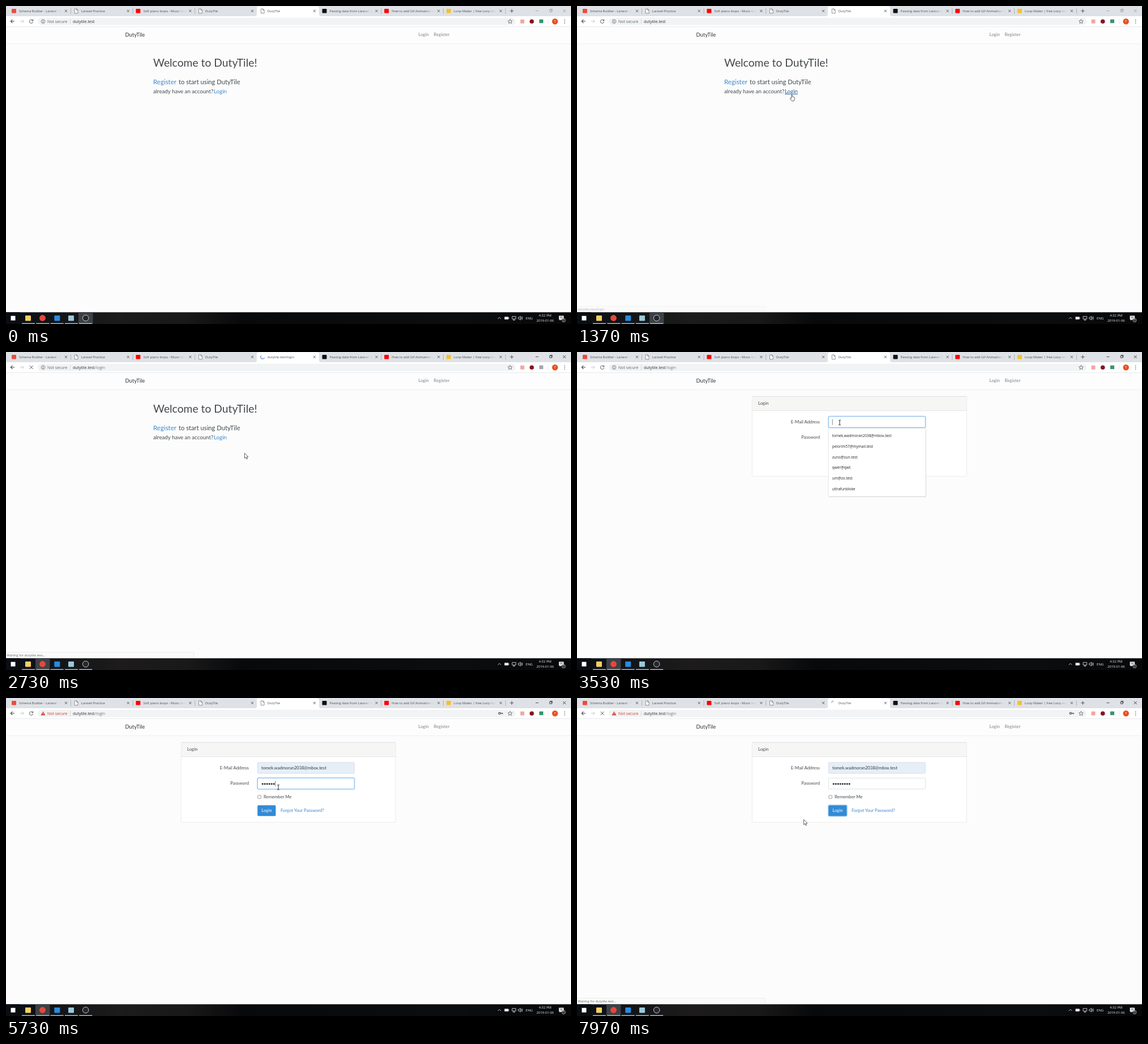
These frames come from a looping animation (998 px wide and 561 px high, 8000 ms). An HTML page:

```html
<!DOCTYPE html>
<html lang="en">
<head>
<meta charset="utf-8">
<title>DutyTile</title>
<style>
  html, body { margin: 0; width: 100%; height: 100%; overflow: hidden; background: #fcfcfc; }
  svg { display: block; width: 100vw; height: 100vh; }
  text { font-family: "Open Sans", "Noto Sans", sans-serif; white-space: pre; }
  .site text { font-family: Lato, "Open Sans", sans-serif; }
  .line { fill: none; stroke: #45494d; stroke-width: .9; }
  .tray { fill: none; stroke: #eee; stroke-width: .8; }
</style>
</head>
<body>
<svg id="stage" viewBox="0 0 998 561"></svg>
<script>
const LOOP = 8000, APP = 'DutyTile', HOST = 'dutytile.test', MAIL = 'tomek.wadmoran2038@mbox.test';
const INK = '#43494e', LINK = '#3a87cd';
const stage = document.getElementById('stage');
const $ = id => document.getElementById(id);

const text = (x, y, s, size, fill = INK, extra = '') =>
  `<text x="${x}" y="${y}" font-size="${size}" fill="${fill}" ${extra}>${s}</text>`;
const rect = (x, y, w, h, fill, extra = '') =>
  `<rect x="${x}" y="${y}" width="${w}" height="${h}" fill="${fill}" ${extra}/>`;
const path = (d, extra = 'class="line"') => `<path d="${d}" ${extra}/>`;
const disc = (x, y, r, fill, extra = '') => `<circle cx="${x}" cy="${y}" r="${r}" fill="${fill}" ${extra}/>`;
const group = (id, body, extra = '') => `<g id="${id}" ${extra}>${body}</g>`;

// Browser tabs: title and icon colour (none = blank page icon)
const tabs = [
  ['Schema Builder - Laravel - The', '#ee4b3c'], ['Laravel Practice'],
  ['Soft piano loops - Music to re', '#f00'], [APP], [APP],
  ['Passing data from Laravel to V', '#111'], ['How to add Gif Animation to', '#f00'],
  ['Loop Maker | free Loop mak', '#f2c230']
];

function tab([title, color], i) {
  const x = i * 109.7, active = i === 4;
  const icon = color ? rect(x + 10, 5, 8, 7.5, color, 'rx="1"')
    : path(`M${x + 11.5} 5h3.8l2 2v5.8h-5.8zM${x + 15} 5v2.3h2.3`, 'fill="#fff" stroke="#666" stroke-width=".7"');
  const back = active
    ? path('M439.5 18q3.5 0 3.5-3.5V4q0-3.5 3.5-3.5h103q3.5 0 3.5 3.5v10.5q0 3.5 3.5 3.5z', 'fill="#fff"')
    : '';
  const fade = active ? '' : rect(x + 82, 2, 15, 14, 'url(#fade)') + rect(x + 97, 2, 14, 14, '#dee1e6');
  const rule = i === 3 || active ? '' : rect(x + 114, 4, .7, 10, '#9a9da2');
  return back + group('icon' + i, icon) + text(x + 23, 10.8, title, 5.8, '#4a4d51', `id="title${i}"`) + fade +
    path(`M${x + 104} 6.7l4 4m0-4l-4 4`) + rule;
}

const browser = () =>
  rect(0, 0, 998, 18, '#dee1e6') + rect(0, 18, 998, 18.5, '#fff') + tabs.map(tab).join('') +
  disc(453.3, 8.7, 3.4, 'none', 'id="spinner" stroke-width="1.1"') +
  path('M890.2 8.7h6.4m-3.2-3.2v6.4') +
  group('controls', path('M935.5 8.5h5M960.3 6.7h3.5v3.5h-3.5zm1-.2v-1h3.5v3.6h-1M983.8 6l5 5m0-5l-5 5', 'fill="none" stroke-width=".8"')) +
  path('M15 27H8.4m3-3.1L8.3 27l3.1 3.1', 'class="line" style="stroke-width:1.1"') +
  path('M24.7 27h6.6m-3-3.1l3.1 3.1-3.1 3.1', 'class="line" style="stroke:#c2c4c6"') +
  group('reload', path('M47.2 25.3a3.2 3.2 0 1 0 .5 2.7M47.8 23.4v2.7h-2.7')) +
  group('stop', path('M41.7 24l6 6m0-6l-6 6')) +
  rect(56, 20.7, 844, 13, '#f1f3f4', 'rx="6.5"') +
  group('plain', disc(65.5, 27.2, 3.3, 'none', 'stroke="#5f6368" stroke-width=".8"') +
    path('M65.5 25v.9m0 .8v2.6') + text(73, 29.7, 'Not secure', 7, '#5f6368')) +
  group('warn', path('M65.5 23.4l3.9 7.2h-7.8z', 'fill="#d33a2f"') +
    path('M65.5 25.8v2.3m0 .6v.9', 'stroke="#fff" stroke-width=".8"') + text(73, 29.7, 'Not secure', 7, '#d33a2f')) +
  rect(113, 22.5, .6, 9.5, '#c4c7ca') +
  text(118, 29.7, `${HOST}<tspan id="route" fill="#74787c">/login</tspan>`, 7, '#2c2e30') +
  group('key', disc(871.8, 27, 1.6, 'none', 'stroke="#55595d" stroke-width="1.3"') +
    path('M873.5 27h4.2m-1 0v1.6', 'fill="none" stroke="#55595d" stroke-width="1.3"')) +
  path('M890.4 23.3l1.1 2.6 2.8.2-2.1 1.8.7 2.8-2.5-1.5-2.4 1.5.6-2.8-2.1-1.8 2.8-.2z', 'class="line" style="stroke-width:.7"') +
  rect(908.5, 23.7, 7, 7, '#f0a7a0', 'rx="1"') + disc(928.7, 27.2, 3.8, '#8c1220') +
  rect(942, 23.7, 7, 6.5, '#35946e', 'id="ext"') + rect(957.5, 22, .6, 10, '#dadce0') +
  disc(969.7, 27.2, 5.2, '#e8501e') + text(969.7, 29.3, 'T', 5.6, '#fff', 'text-anchor="middle"') +
  [24.2, 27.2, 30.2].map(y => disc(986.7, y, .8, '#55595d')).join('') +
  rect(0, 36.2, 998, .8, '#e3e5e8');

const home = () =>
  text(260, 107, `Welcome to ${APP}!`, 19.3) +
  text(260, 138.2, 'Register', 11.5, LINK) + text(305, 138.2, `to start using ${APP}`, 11.2) +
  text(260, 153.9, 'already have an account?', 9.7) + text(367, 153.9, 'Login', 9.7, LINK, 'id="link"');

const field = (id, y) => rect(444.3, y, 171, 19.3, '#fff', `id="${id}" rx="2"`);
const ring = (id, x, y, w, h) =>
  rect(x, y, w, h, 'none', `id="${id}" rx="2.5" stroke="#3490dc" stroke-opacity=".32" stroke-width="1.8"`);

const login = () =>
  rect(309.3, 78.3, 379, 141, '#fff', 'rx="2" stroke="#e2e2e0" stroke-width=".7"') +
  rect(309.6, 78.6, 378.4, 25, '#f6f6f5') + rect(309.3, 78, 379, .7, '#d8dbe9') + rect(309.3, 103.3, 379, .7, '#dcdddc') +
  text(320, 93, 'Login', 7.8) +
  text(429, 125.7, 'E-Mail Address', 7.8, INK, 'text-anchor="end"') +
  text(429, 153.3, 'Password', 7.8, INK, 'text-anchor="end"') +
  field('mail', 113.8) + ring('mailRing', 443.9, 113.4, 171.8, 20.1) + text(451, 126.2, MAIL, 7.6, '#33383c', 'id="mailText"') +
  field('pass', 141.2) + ring('passRing', 443.9, 140.8, 171.8, 20.1) +
  Array.from({ length: 8 }, (_, i) => disc(453.2 + 4 * i, 151.6, 1.55, '#33383c', `id="dot${i}"`)).join('') +
  rect(450.8, 118.7, .7, 10, '#555', 'id="caret"') +
  rect(444.8, 171.8, 5.6, 5.6, '#f6f6f6', 'rx=".8" stroke="#8d8d8d" stroke-width=".8"') + text(455, 177.2, 'Remember Me', 7.7) +
  rect(444.2, 189.2, 32.3, 19, '#3490dc', 'id="button" rx="2"') + ring('buttonRing', 443.6, 188.6, 33.5, 20.2) +
  text(460.4, 201.2, 'Login', 7.8, '#fff', 'text-anchor="middle"') + text(485, 201.2, 'Forgot Your Password?', 7.7, LINK);

const entries = [MAIL, 'pelorim57@mymail.test', 'zuno@zun.test', 'qwer@qwt', 'um@zo.test', 'ultrafunbloke'];
const menu = () =>
  rect(444.6, 136, 172, 120, '#0002', 'rx="1.5"') +
  rect(444, 134.6, 172, 120.4, '#fff', 'rx="1.5" stroke="#d5d5d5" stroke-width=".6"') +
  rect(444.3, 138.7, 171.4, 18.6, '#eee', 'id="pick"') +
  entries.map((s, i) => text(450.7, 150.3 + 18.7 * i, s, 6.5, '#222')).join('');

const slots = [[39, '#f7cf63'], [64.5, '#e5483a'], [90.3, '#2a8be0'], [115, '#9cc9d8']];
const taskbar = () =>
  rect(0, 540.3, 998, 20.7, 'url(#bar)') + rect(0, 540.3, 25, 20.7, '#0a0d12') +
  rect(128, 540.3, 25.5, 20.7, '#3d4146', 'id="active"') +
  rect(8.5, 546.7, 8, 8, '#fff') +
  slots.map(([x, c], i) => i === 1 ? disc(x, 550.5, 5.4, c) : rect(x - 5, 546 , 10, 9.4, c, 'rx="1"')).join('') +
  disc(140.7, 550.5, 5.3, '#26282c', 'stroke="#ddd" stroke-width=".9"') +
  [28, 53.3, 78.6, 103.9, 129.2].map(x => rect(x, 559.4, 23, 1.6, '#76b9ed')).join('') +
  path('M868.8 552l2.8-2.8 2.8 2.8', 'class="tray"') +
  rect(880.5, 548.3, 7, 4.6, '#eee') + rect(887.6, 549.6, 1, 2, '#eee') +
  path('M894 547.7h6.6v4.5H894zm3.3 4.5v2m-2 0h4', 'class="tray"') +
  path('M904.8 549.2h1.6l2.2-2v6.8l-2.2-2h-1.6zm5.2-.2q1.2 1.6 0 3.2m1.2-4.6q2.2 3 0 6', 'class="tray"') +
  text(918, 552.7, 'ENG', 6.1, '#eee') +
  text(952.3, 548, '4:32 PM', 6, '#eee', 'text-anchor="middle"') +
  text(952.3, 556.8, '2019-01-06', 5.9, '#eee', 'text-anchor="middle"') +
  path('M976.7 546.4h8.4v6.8h-5l-1.7 2v-2h-1.7z', 'fill="#fff"') + path('M978.4 548.5h5m-5 2h5', 'stroke="#222" stroke-width=".7"') +
  disc(985, 554.4, 3.2, '#26282c', 'stroke="#ddd" stroke-width=".6"') + text(985, 556.3, '1', 5, '#fff', 'text-anchor="middle"');

stage.innerHTML =
  `<defs><linearGradient id="fade"><stop stop-color="#dee1e6" stop-opacity="0"/><stop offset="1" stop-color="#dee1e6"/></linearGradient>
  <linearGradient id="bar"><stop stop-color="#0a0f15"/><stop offset=".2" stop-color="#1d1b1b"/><stop offset=".32" stop-color="#191919"/>
  <stop offset=".42" stop-color="#08090b"/><stop offset=".8" stop-color="#0c0d0f"/><stop offset="1" stop-color="#07080a"/></linearGradient></defs>` +
  rect(0, 0, 998, 561, '#fcfcfc') + browser() +
  group('page', rect(0, 37, 998, 29, '#fdfdfd') + rect(0, 66, 998, 1, '#eeeff4') +
    text(210.5, 54.2, APP, 9.4, '#2d3236') + text(728.4, 53.4, 'Login', 7.9, '#7d8083') + text(755.5, 53.4, 'Register', 7.9, '#7d8083') +
    group('home', home()) + group('login', login()), 'class="site"') +
  group('menu', menu()) +
  group('status', rect(-1, 529.8, 333, 11, '#fafafa', 'stroke="#e6e6e0" stroke-width=".7"') + text(1.5, 537.2, '', 5.8, '#63676a', 'id="hint"')) +
  taskbar() +
  group('cursor',
    group('arrow', path('M0 0v9l2.1-1.9 1.5 3.3 1.5-.7-1.5-3.2h2.8z', 'fill="#fff" stroke="#222" stroke-width=".7"')) +
    group('hand', path('M-.9 6.5V.9q0-.9.9-.9t.9.9v3.3q2.2 0 3.6.9.6.4.5 1.5l-.4 2.4-.8 2.3h-4L-2.9 7.6q-.5-1.2.6-1.4.6.1 1.4 1z', 'fill="#fff" stroke="#222" stroke-width=".7"')) +
    group('beam', path('M-1.9-4.4q1.9 0 1.9.8v7.2q0 .8 1.9.8M1.9-4.4q-1.9 0-1.9.8m0 7.2q0 .8-1.9.8', 'fill="none" stroke="#111" stroke-width=".9"')));

// Pointer stops: time, x, y of the hot spot
const route = [
  [220, 470, 566], [1220, 379.5, 156], [2150, 379.5, 156], [2650, 421.5, 178.5], [2800, 421.5, 178.5],
  [3300, 464, 124.5], [3560, 464, 124.5], [3800, 487, 147], [3960, 487, 147], [4350, 481, 157.5],
  [6480, 481, 157.5], [6740, 367, 176], [6810, 367, 176], [6930, 325, 186], [7220, 457, 203],
  [7430, 457, 203], [7880, 400.5, 214.5], [LOOP, 400.5, 214.5]
];
const keys = [4730, 5070, 5300, 5430, 5570, 5700, 5900, 6170];
const CLICK = 1880, COMMIT = 2700, PAINT = 2790, LOADED = 2930;
const MENU_ON = 3430, CHOSEN = 3940, PASS = 4420, SUBMIT = 7330;

function pointer(t) {
  const n = route.findIndex(p => p[0] > t);
  if (n < 1) return [-50, 600];
  const [a, ax, ay] = route[n - 1], [b, bx, by] = route[n];
  const k = (t - a) / (b - a), e = k * k * (3 - 2 * k);
  return [ax + (bx - ax) * e, ay + (by - ay) * e];
}

const show = (id, on) => $(id).setAttribute('display', on ? 'inline' : 'none');
const set = (id, attrs) => { for (const k in attrs) $(id).setAttribute(k, attrs[k]); };
const say = (id, s) => { if ($(id).textContent !== s) $(id).textContent = s; };

function draw(t) {
  const [x, y] = pointer(t);
  const over = (l, top, r, b) => x > l && x < r && y > top && y < b;
  const onLogin = t >= PAINT, open = t >= MENU_ON && t < CHOSEN, used = t >= CLICK;
  const loading = used && t < LOADED || t >= SUBMIT;
  const committed = t >= COMMIT && t < LOADED;
  const onLink = !onLogin && over(366, 145, 391, 158);
  const onButton = onLogin && over(444, 189, 477, 208);
  const onField = onLogin && (over(444, 113, 616, 134) || !open && over(444, 141, 616, 161));

  show('home', !onLogin); show('login', onLogin); show('menu', open);
  show('pick', over(444, 139, 616, 157));
  set('link', { fill: onLink ? '#1d5f9c' : LINK, 'text-decoration': onLink ? 'underline' : 'none' });

  show('reload', !loading); show('stop', loading); show('spinner', loading); show('icon4', !loading);
  set('spinner', committed
    ? { stroke: '#4f7fe0', 'stroke-dasharray': '12 30', transform: `rotate(${20 + (t - 2730) * .5} 453.3 8.7)` }
    : { stroke: '#8b9097', 'stroke-dasharray': '5.3 30', transform: `rotate(${180 - (t - 7970) * .36} 453.3 8.7)` });
  say('title4', committed ? HOST + '/login' : APP);
  show('route', t >= COMMIT);
  set('ext', { fill: committed ? '#a3a8ad' : '#35946e' });
  set('controls', { stroke: used ? '#222' : '#999' });
  set('active', { x: used ? 52 : 128 });

  const typed = keys.filter(k => t >= k).length;
  show('warn', typed); show('plain', !typed); show('key', typed);
  keys.forEach((k, i) => show('dot' + i, t >= k));

  const inMail = t >= 3400 && t < PASS, inPass = t >= PASS && t < SUBMIT;
  const edge = on => on ? '#a1cbef' : '#ced4da';
  set('mail', { fill: t >= CHOSEN ? '#e6eff8' : '#fff', stroke: edge(inMail), 'stroke-width': .7 });
  set('pass', { stroke: edge(inPass), 'stroke-width': .7 });
  show('mailRing', inMail); show('passRing', inPass); show('buttonRing', t >= SUBMIT);
  show('mailText', t >= CHOSEN);
  show('caret', inMail && t < CHOSEN || inPass && typed && t - keys[typed - 1] < 300);
  set('caret', inPass ? { x: 451.4 + 4 * typed, y: 146.2 } : { x: 450.8, y: 118.7 });
  set('button', { fill: onButton ? '#227dc7' : '#328bd6' });

  const hover = t > 1250 && t < CLICK;
  show('status', hover || loading);
  set('status', { opacity: hover ? Math.min(1, (t - 1250) / 240) : 1 });
  say('hint', hover ? HOST + '/login' : `Waiting for ${HOST}...`);

  set('cursor', { transform: `translate(${x} ${y})` });
  show('hand', onLink || onButton); show('beam', onField);
  show('arrow', !onLink && !onButton && !onField);
}

const start = performance.now();
(function tick() {
  draw((performance.now() - start) % LOOP);
  requestAnimationFrame(tick);
})();
</script>
</body>
</html>
```
